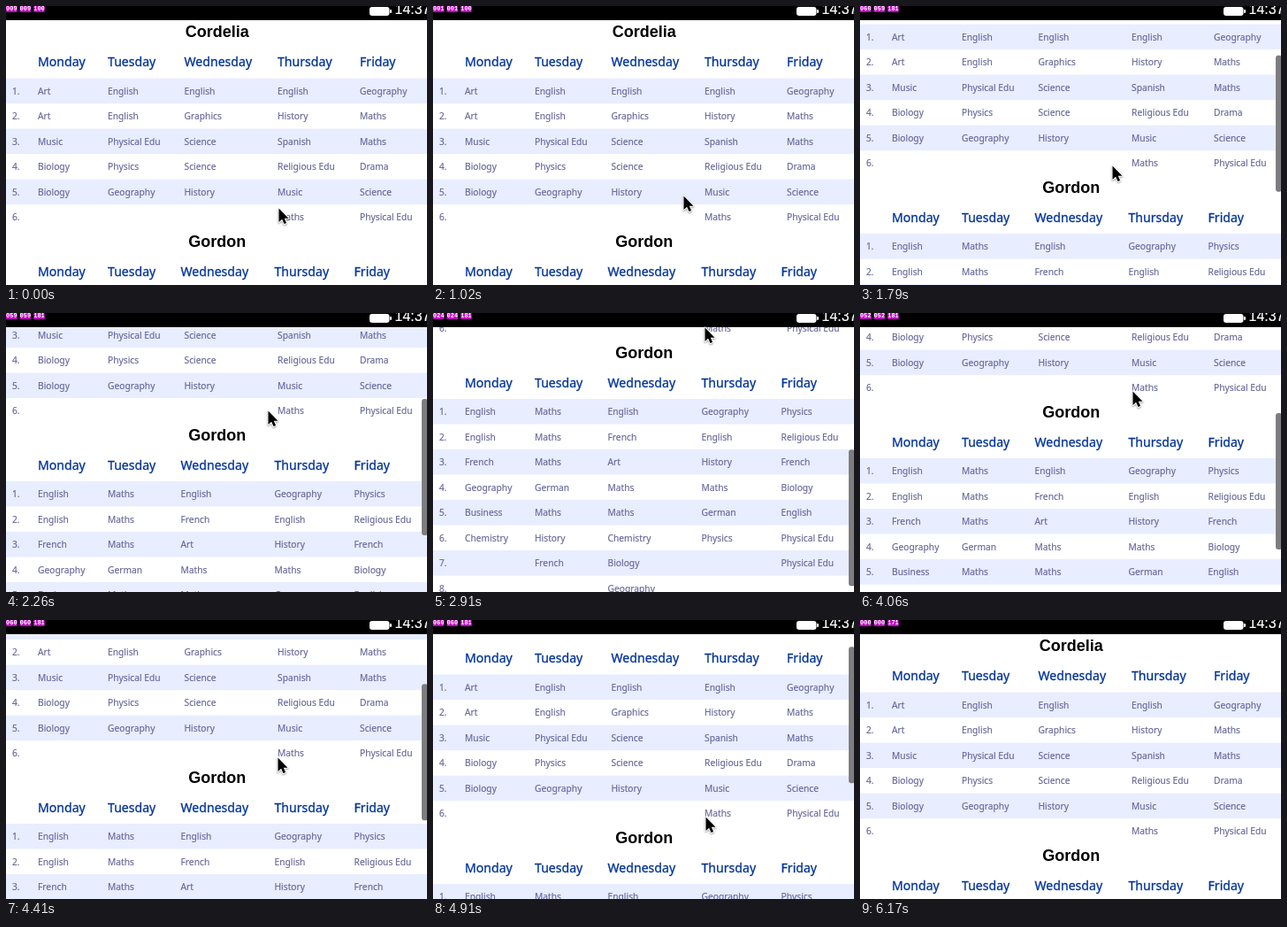
Write an HTML page with a canvas that moves like this. It is 476x315 px and loops after 7230 ms.

```html
<!DOCTYPE html>
<html lang="en">
<head>
<meta charset="utf-8">
<title>Scrolling timetable</title>
<style>
html, body { margin: 0; width: 100%; height: 100%; overflow: hidden; background: #fff; }
canvas { display: block; width: 476px; height: 315px; }
</style>
</head>
<body>
<canvas id="stage"></canvas>
<script>
const W = 476, H = 315, LOOP = 7230;
const BAR_H = 16, ROW_H = 28.5;
const canvas = document.getElementById('stage');
const ctx = canvas.getContext('2d');
const dpr = window.devicePixelRatio || 1;
canvas.width = W * dpr;
canvas.height = H * dpr;

const DAYS = ['Monday', 'Tuesday', 'Wednesday', 'Thursday', 'Friday'];
const TABLES = [
  {
    name: 'Cordelia', top: 0, cols: [36, 115, 201.5, 307, 400],
    rows: [
      'Art,English,English,English,Geography',
      'Art,English,Graphics,History,Maths',
      'Music,Physical Edu,Science,Spanish,Maths',
      'Biology,Physics,Science,Religious Edu,Drama',
      'Biology,Geography,History,Music,Science',
      ',,,Maths,Physical Edu'
    ]
  },
  {
    name: 'Gordon', top: 236.4, cols: [36, 115, 197.5, 303.5, 393.5],
    rows: [
      'English,Maths,English,Geography,Physics',
      'English,Maths,French,English,Religious Edu',
      'French,Maths,Art,History,French',
      'Geography,German,Maths,Maths,Biology',
      'Business,Maths,Maths,German,English',
      'Chemistry,History,Chemistry,Physics,Physical Edu',
      ',French,Biology,,Physical Edu',
      ',,Geography,,'
    ]
  }
];

// [time, value...] keys, linear in between
const SCROLL = [
  [0, 0], [1499, 0], [1500, 12], [1790, 61], [2260, 128], [2910, 222], [2970, 228],
  [3080, 231], [3439, 231], [3440, 228], [3720, 201], [4410, 88], [4860, 20],
  [5080, 5], [5310, 0]
];
const CURSOR = [
  [0, 308, 228], [59, 308, 228], [60, 295, 220], [119, 295, 220], [120, 283, 214],
  [1499, 283, 214], [1790, 285, 180], [2260, 296, 110], [2910, 307, 15],
  [3080, 308, 6], [3439, 308, 6], [3720, 309, 39], [4410, 307, 155],
  [4860, 308, 222], [5310, 308, 243], [5489, 308, 243], [6150, 318, 322]
];
const BAR_ALPHA = [[0, 0], [1499, 0], [1500, 1], [5489, 1], [5780, 0]];
const COUNTERS = [
  [0, '009 009 100'], [1020, '001 001 100'], [1500, '060 059 181'],
  [2240, '059 059 181'], [2880, '024 024 181'], [3440, '052 052 181'],
  [4180, '060 060 181'], [5490, '000 000 171']
];
// moving spans: [start, end, step]
const SPANS = [[1500, 3090, 58.6], [3440, 5320, 57], [5490, 6180, 57]];

function stepTime(t) {
  const span = SPANS.find(([a, b]) => t >= a && t < b);
  if (!span) return t;
  const [start, , step] = span;
  return start + Math.floor((t - start) / step + 0.1) * step;
}

function valueAt(keys, t) {
  const i = keys.findIndex(k => k[0] > t);
  if (i < 0) return keys[keys.length - 1].slice(1);
  const a = keys[i - 1], b = keys[i];
  const p = (t - a[0]) / (b[0] - a[0]);
  return a.slice(1).map((v, n) => v + (b[n + 1] - v) * p);
}

function label(str, x, y, font, color, weight = 0) {
  ctx.font = font;
  ctx.fillStyle = color;
  ctx.fillText(str, x, y);
  if (weight) {
    ctx.strokeStyle = color;
    ctx.lineWidth = weight;
    ctx.strokeText(str, x, y);
  }
}

function pill(x, y, w, h, r, color) {
  ctx.fillStyle = color;
  ctx.beginPath();
  ctx.roundRect(x, y, w, h, r);
  ctx.fill();
}

function drawTable({ name, top, cols, rows }) {
  const cellFont = '10.25px "Noto Sans", sans-serif';
  ctx.textAlign = 'center';
  label(name, 238.8, top + 35.3, 'bold 18px "Liberation Sans", sans-serif', '#000');
  ctx.textAlign = 'left';
  DAYS.forEach((day, i) =>
    label(day, cols[i], top + 68.4, '14.1px "Noto Sans", sans-serif', '#003399', 0.3));
  rows.forEach((row, r) => {
    const y = top + 81.6 + r * ROW_H;
    if (r % 2 === 0) {
      ctx.fillStyle = '#e8edff';
      ctx.fillRect(0, y, W, ROW_H);
    }
    label(`${r + 1}.`, 7, y + 18, cellFont, '#666699', 0.15);
    row.split(',').forEach((cell, i) =>
      label(cell, cols[i], y + 18, cellFont, '#666699', 0.15));
  });
}

function drawStatus(t) {
  ctx.fillStyle = '#000';
  ctx.fillRect(0, 0, W, BAR_H);
  const counters = COUNTERS.filter(k => k[0] <= t).pop()[1].split(' ');
  counters.forEach((num, i) => {
    const x = i * 15.6;
    ctx.fillStyle = '#c000c0';
    ctx.fillRect(x, 0, 12.5, 7);
    label(num, x, 5, 'bold 7px "Liberation Mono", monospace', '#fff');
  });
  pill(411, 1, 22.5, 10, 3, '#fff');
  pill(434, 4, 2, 4, 1, '#fff');
  label('14:37', 439.5, 9.3, '16px "Liberation Sans", sans-serif', '#fff', 0.2);
}

function drawCursor(x, y) {
  const arrow = new Path2D('M0 0V15.5L3.6 12.2L6 17.6L8.6 16.5L6.3 11.3H11Z');
  ctx.save();
  ctx.translate(x + 0.5, y + 0.5);
  ctx.lineJoin = 'round';
  ctx.lineWidth = 2;
  ctx.strokeStyle = '#fff';
  ctx.shadowColor = 'rgba(0,0,0,0.4)';
  ctx.shadowBlur = 2 * dpr;
  ctx.shadowOffsetY = dpr;
  ctx.stroke(arrow);
  ctx.shadowColor = 'transparent';
  ctx.fillStyle = '#000';
  ctx.fill(arrow);
  ctx.restore();
}

function draw(time) {
  const t = stepTime(time);
  const scroll = Math.round(valueAt(SCROLL, t)[0]);
  ctx.setTransform(dpr, 0, 0, dpr, 0, 0);
  ctx.fillStyle = '#fff';
  ctx.fillRect(0, 0, W, H);

  ctx.save();
  ctx.translate(0, -scroll);
  TABLES.forEach(drawTable);
  ctx.restore();

  ctx.globalAlpha = valueAt(BAR_ALPHA, t)[0];
  pill(470, 18 + scroll * 0.617, 7, 154, 3, '#7d7d80');
  ctx.globalAlpha = 1;

  drawStatus(t);
  const [x, y] = valueAt(CURSOR, t);
  if (y < H) drawCursor(Math.round(x), Math.round(y));
}

const begin = performance.now();
function tick() {
  draw((performance.now() - begin) % LOOP);
  requestAnimationFrame(tick);
}
tick();
</script>
</body>
</html>
```
